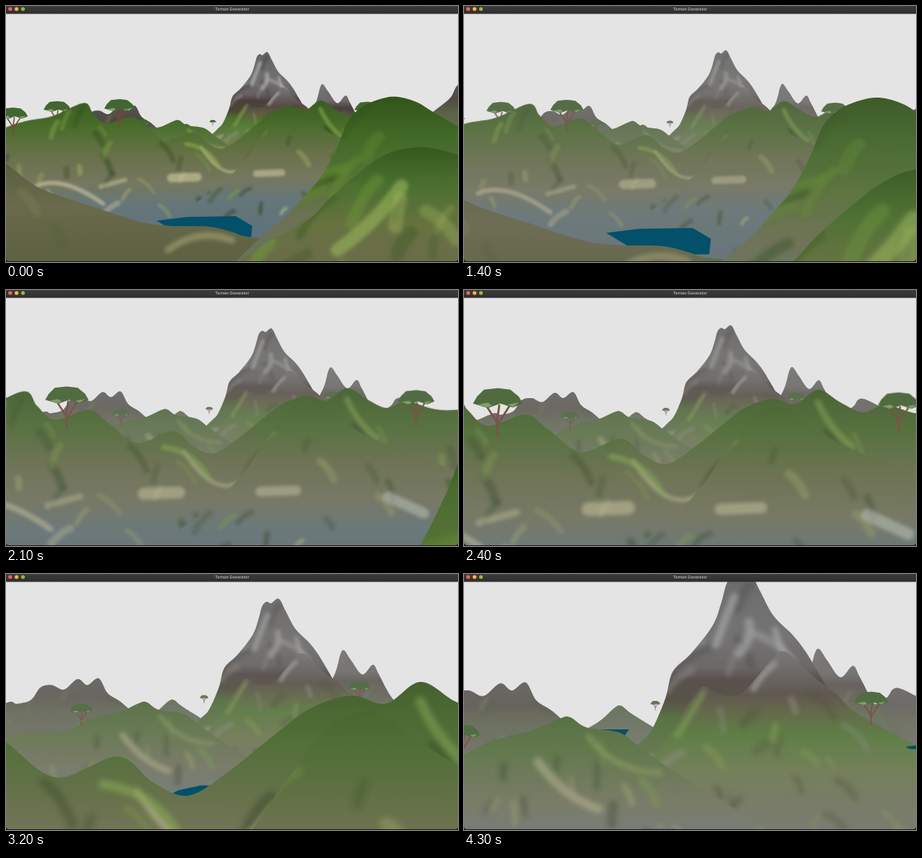
Write an HTML page that moves like this. It is 600x341 px and loops after 4.4 s.

```html
<!DOCTYPE html>
<html lang="en">
<head>
<meta charset="utf-8">
<title>Terrain Generator</title>
<style>
html, body { margin: 0; width: 100%; height: 100%; overflow: hidden; background: #e4e4e4; }
svg { display: block; width: 100%; height: 100%; }
</style>
</head>
<body>
<svg viewBox="0 0 600 341" preserveAspectRatio="none">
  <defs>
    <filter id="soft" filterUnits="userSpaceOnUse" x="-400" y="0" width="1400" height="700"><feGaussianBlur stdDeviation="2.4"/></filter>
    <linearGradient id="bar" x2="0" y2="1"><stop stop-color="#3d3c3d"/><stop offset="1" stop-color="#2f2e2f"/></linearGradient>
  </defs>
  <rect width="600" height="341" fill="#e4e4e4"/>
  <g id="scene"></g>
  <rect width="600" height="10.5" fill="url(#bar)"/>
  <circle cx="5.5" cy="4" r="2.5" fill="#ff5f57"/>
  <circle cx="14" cy="4" r="2.5" fill="#febc2e"/>
  <circle cx="22.5" cy="4" r="2.5" fill="#8fbd3c"/>
  <text x="300" y="6" font-family="Inter, 'Liberation Sans', sans-serif" font-size="5.3" font-weight="600" fill="#b9b8b9" text-anchor="middle">Terrain Generator</text>
  <path d="M0 336Q0 340 4 340H596Q600 340 600 336V341H0Z" fill="#1d1c1a"/>
</svg>
<script>
// The camera stands still while fog rolls in, then flies towards (CX, CY).
// Everything is drawn as seen at second `at`; the camera reaches it at second `pass`.
const LOOP = 4.4, STEP = .1, DEPART = 1.15, CX = 320, CY = 113;
const HAZE = '#80807b';
const scene = document.querySelector('#scene'), defs = document.querySelector('defs');
const updates = [];
let seed = 11, ids = 0;

const rand = () => (seed = seed * 16807 % 2147483647) / 2147483647;
const lerp = (a, b, f) => a + (b - a) * f;
const parse = s => s.split(' ').map(p => p.split(',').map(Number));

function make(tag, attrs, parent) {
  const el = document.createElementNS('http://www.w3.org/2000/svg', tag);
  for (const k in attrs) el.setAttribute(k, attrs[k]);
  return parent.appendChild(el);
}

// A group that grows with nearness; its haze thickens with distance.
function placed(at, pass, draw) {
  const g = make('g', {}, scene), haze = draw(g);
  updates.push(t => {
    const far = pass - Math.max(t, DEPART), k = (pass - at) / far;
    g.style.display = far > 0 && k < 8 ? '' : 'none';
    g.setAttribute('transform', `translate(${CX * (1 - k)} ${CY * (1 - k)}) scale(${k})`);
    if (haze) haze.setAttribute('opacity', Math.min(1, t / DEPART) * (1 - Math.exp(-.12 * far)));
  });
}

function curve(p) {
  let d = 'M' + p[0];
  for (let i = 0; i < p.length - 1; i++) {
    const a = p[i - 1] || p[i], b = p[i], c = p[i + 1], e = p[i + 2] || c;
    d += 'C' + [b[0] + (c[0] - a[0]) / 6, b[1] + (c[1] - a[1]) / 6,
      c[0] - (e[0] - b[0]) / 6, c[1] - (e[1] - b[1]) / 6, ...c];
  }
  return d;
}

// Light and dark folds run down the slope and level out lower on the hill.
function folds(parent, line, depth, { n, size, lights, dark }) {
  const left = line[0][0], right = line[line.length - 1][0];
  for (let i = 0; i < n; i++) {
    const x = lerp(left, right, (i + rand()) / n), q = rand();
    const j = Math.max(1, line.findIndex(p => p[0] > x)), a = line[j - 1], b = line[j];
    const slope = (b[1] - a[1]) / (b[0] - a[0]);
    const y = a[1] + slope * (x - a[0]) + q * depth;
    const len = size * (.6 + rand()), dx = len * (slope * (1 - q) + (rand() - .5) * 2.4 * q), dy = len * (1 - .7 * q);
    make('path', {
      d: `M${x} ${y}q${dx * .6} ${dy * .3} ${dx} ${dy}`,
      stroke: i % 2 ? lights[Math.floor(q * lights.length)] : dark,
      'stroke-width': size * (.2 + .25 * rand()), opacity: .3 + .25 * rand()
    }, parent);
  }
}

const grass = ['#7fa546', '#a9b46c', '#c8c69b', '#b9c0b4'], stone = ['#b9b8b9', '#a5a1a0', '#8fae58', '#a9ad74'];

// stops: depth#colour, measured down from `top`; glints: [path, colour, width]
function ridge({ at, pass, line, stops, top, n = 0, size = 18, lights = grass, dark = '#2f4620', glints = [] }) {
  const pts = parse(line), rows = stops.split(' ').map(v => v.split('#'));
  const depth = +rows[rows.length - 1][0], id = 'r' + ids++;
  const y = top ?? Math.min(...pts.map(p => p[1]));
  const grad = make('linearGradient', { id: id + 'g', gradientUnits: 'userSpaceOnUse', x1: 0, x2: 0, y1: y, y2: y + depth }, defs);
  for (const [o, c] of rows) make('stop', { offset: o / depth, 'stop-color': '#' + c }, grad);
  const d = `${curve(pts)}V900H${pts[0][0]}Z`;
  make('path', { d }, make('clipPath', { id: id + 'c' }, defs));
  placed(at, pass, g => {
    make('path', { d, fill: `url(#${id}g)` }, g);
    const glow = make('g', { filter: 'url(#soft)', fill: 'none', 'stroke-linecap': 'round' },
      make('g', { 'clip-path': `url(#${id}c)` }, g));
    folds(glow, pts, depth, { n, size, lights, dark });
    for (const [d, stroke, w] of glints) make('path', { d, stroke, 'stroke-width': w, opacity: .6 }, glow);
    return make('path', { d, fill: HAZE }, g);
  });
}

function water(at, pass, points) {
  placed(at, pass, g => { make('polygon', { points, fill: '#02506a' }, g); });
}

function tree(at, pass, x, y, width) {
  placed(at, pass, g => {
    const spot = make('g', { transform: `translate(${x} ${y}) scale(${width})` }, g);
    const shape = (leaf, wood, parent) => {
      make('path', { d: 'M0 .75L-.02 .45L-.25 .1M-.02 .45L.03 .1M0 .5L.25 .1', fill: 'none', stroke: wood, 'stroke-width': .04 }, parent);
      make('path', { d: 'M-.5 .08L-.42 -.06L-.28 -.2L0 -.23L.25 -.2L.42 -.06L.5 .08L.3 .16L.05 .08L-.2 .17Z', fill: leaf }, parent);
    };
    shape('#42662f', '#7a463c', spot);
    make('path', { d: 'M-.4 .1L-.2 .06L-.12 .12L-.22 .16ZM.2 .1L.42 .06L.3 .15Z', fill: '#7fa968' }, spot);
    const haze = make('g', {}, spot);
    shape(HAZE, HAZE, haze);
    return haze;
  });
}

// Far peaks
const rock = '0#565354 25#504844 45#5b6448 90#706f60';
ridge({ at: 1.15, pass: 4, line: '540,160 572,137 590,122 599,106 615,98 660,140', stops: rock });
ridge({ at: 4.3, pass: 12.7, line: '510,190 557,168 569,154 580,153 605,165 660,190', stops: rock, n: 8, size: 9 });
ridge({ at: 3.2, pass: 10.6, stops: '0#777577 28#6b6868 40#4c3f3e 75#5b6a47', n: 14, size: 11, lights: stone, dark: '#4b494b',
  line: '420,165 437,132 444,107 449,102 458,115 473,134 487,121 495,134 513,166 540,190' });
ridge({ at: 3.2, pass: 9.55, stops: rock, n: 20, size: 9,
  line: '-60,200 0,172 14,173 33,168 46,151 61,148 77,154 95,140 108,148 123,139 135,159 153,171 178,194' });
ridge({ at: 3.2, pass: 12, stops: '0#4a6636 45#757a66', line: '150,212 194,188 215,170 223,168 236,178 280,205' });
tree(3.2, 11.3, 263, 164, 11);
water(4.3, 20, '174,209 185,207 219,207 212,217 200,220');

// Main mountain with its green shoulder
ridge({ at: 3.2, pass: 6.9, n: 46, size: 22, lights: stone, dark: '#474546',
  line: '225,225 258,193 270,180 283,150 290,125 307,108 327,82 335,61 340,43 346,37 352,39 362,33 371,49 384,73 402,91 415,108 428,130 440,150 457,173 500,215',
  stops: '0#666466 60#717071 88#656060 100#4c3f3b 120#4a4534 136#4c702e 190#6b8050 230#7a7a68',
  glints: [['M347 55Q335 85 330 100', '#c4c3c5', 7], ['M361 78Q364 95 352 108', '#bfbec0', 8], ['M385 85Q390 105 405 122', '#cccbcd', 5]] });
ridge({ at: 3.7, pass: 6.9, n: 60, size: 20, lights: ['#a09a97', '#8fb04e', '#85a452', '#b3b47f'], dark: '#46432f',
  line: '180,290 235,253 270,212 300,165 313,147 320,143 330,149 348,153 365,145 395,110 405,105 415,111 440,135 460,150 485,173 540,203 620,245',
  stops: '0#787574 28#625c59 46#564a42 64#5b613a 90#547e33 130#71804f 190#797a6c 260#728083',
  glints: [['M395 118Q380 130 372 146', '#c8c7c6', 6], ['M318 150Q300 180 290 196', '#8cb44e', 6]] });
tree(3.7, 6.6, 495, 156, 36);
water(4.3, 20, '586,230 601,228 606,234 591,233');

// Middle hills
ridge({ at: 3.2, pass: 7.5, n: 70, size: 20, stops: '0#456a2b 35#57763a 85#777a60 130#6e7d82 170#687a80',
  line: '-160,250 0,216 70,212 110,194 150,184 177,172 187,171 203,181 235,186 255,200 290,225 350,262 450,320',
  glints: [['M155 215Q180 250 215 262', '#c9c594', 9], ['M205 190Q230 225 275 226', '#91ae56', 6]] });
tree(3.2, 6.7, 100, 180, 30);
water(3.7, 7.5, '130,342 150,335 170,335 190,325 217,311 250,304 288,304 260,330 210,400');
tree(1.15, 4.75, 68, 135, 36);

// Valley
const valley = { at: 2.4, top: 133, stops: '0#3a5c21 54#4a6d2c 115#6a714a 170#767860 215#66777a 300#5e727b' };
ridge({ ...valley, pass: 4.7, n: 130, size: 27,
  line: '-400,290 -174,188 -80,165 -15,138 5,160 32,181 82,166 112,186 155,216 208,198 238,220 268,232 300,214 345,178 375,156 410,145 440,152 470,133 500,150 530,163 560,153 610,166 720,172 900,260',
  glints: [['M225 228Q285 325 345 240', '#d6d39e', 5], ['M195 222Q240 228 262 268', '#8cb44c', 8],
    ['M165 292L218 290', '#d2cea0', 18], ['M20 310L70 296', '#bdbb93', 9], ['M-112 309Q-60 285 25 345', '#d0caa6', 9],
    ['M330 262Q375 235 405 185', '#8aac52', 8], ['M470 150Q485 185 515 208', '#83a84c', 9]] });
tree(2.4, 4.4, 45, 146, 66);
tree(1.15, 4, 10, 144, 38);
tree(1.8, 4.45, 519, 141, 43);
ridge({ ...valley, pass: 4.4, n: 50, size: 27,
  line: '40,460 230,341 300,280 350,212 385,168 420,156 455,178 500,205 560,232 640,262 800,350',
  glints: [['M340 292L395 290', '#c9c79f', 15], ['M535 300L590 325', '#c3cbc2', 16]] });
water(1.15, 4.05, '200,286 240,281 305,280 327,293 325,312 290,312 230,304');

// Near slopes
ridge({ at: 1.15, pass: 3.15, n: 16, size: 34, lights: ['#787a52', '#989769'], dark: '#525e38',
  line: '-40,180 0,210 40,240 80,256 115,267 150,279 185,289 220,293 270,294 300,301 326,308 400,312 640,320',
  stops: '0#3f5727 45#5d6344 85#6a6a4c 150#5e6242',
  glints: [['M215 325Q255 295 300 312', '#a3a275', 9]] });
ridge({ at: 1.15, pass: 2.9, n: 44, size: 40, lights: ['#5f8a2e', '#7ba343', '#95a562'], dark: '#2f4f1a',
  line: '300,345 345,302 370,282 395,255 420,225 440,187 455,152 475,133 500,123 520,121 545,128 570,143 640,185',
  stops: '0#32541a 50#406826 110#587336 160#6c7252 220#68735f' });
ridge({ at: 1.15, pass: 2.11, n: 20, size: 44, lights: ['#6f9a3a', '#93a85a', '#a0a170'], dark: '#405a26',
  line: '280,360 345,316 400,286 430,256 465,225 500,200 530,190 570,190 640,212',
  stops: '0#365a1e 50#4b7030 100#66723f 150#6b6c4a',
  glints: [['M525 240Q490 290 440 325', '#97b659', 18]] });

const began = performance.now();
let shown = -1;
function frame(now) {
  const step = Math.floor(Math.max(0, now - began) / 1000 % LOOP / STEP);
  if (step !== shown) {
    shown = step;
    for (const update of updates) update(step * STEP);
  }
  requestAnimationFrame(frame);
}
frame(began);
</script>
</body>
</html>
```
